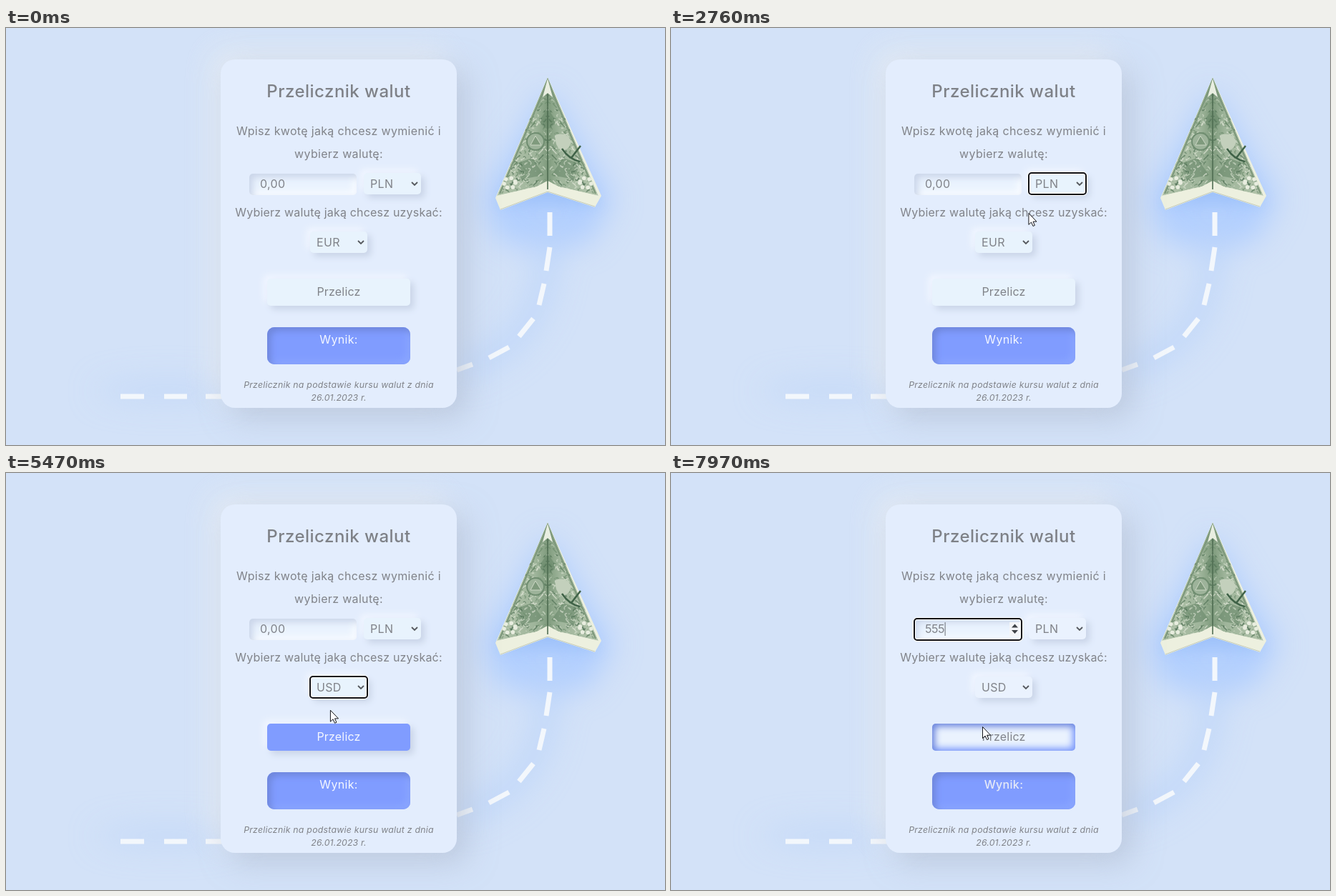
These frames come from a looping animation (921 px wide and 584 px high, 8000 ms). An HTML page:

```html
<!DOCTYPE html>
<html lang="pl">
<head>
<meta charset="utf-8">
<title>Przelicznik walut</title>
<style>
html, body { margin: 0; width: 100%; height: 100%; overflow: hidden; background: #d3e2f8; }
#stage { position: relative; width: 921px; height: 584px; overflow: hidden; }
#stage > * { position: absolute; }
svg { left: 0; top: 0; }
text { font: 16px Inter, "Open Sans", sans-serif; letter-spacing: .02em; fill: #808389; white-space: pre; }
.mid { text-anchor: middle; }
.title { font-size: 24px; font-weight: 500; fill: #7e8187; }
.tight { letter-spacing: .012em; }
.note { font-size: 12.3px; font-style: italic; }
.white { fill: #f4f7ff; }
.card { left: 300px; top: 44px; width: 330px; height: 488px; border-radius: 20px; background: #e3edfd;
  box-shadow: 14px 14px 40px rgba(165,178,200,.5), -14px -14px 40px rgba(236,240,243,.65); }
.input { left: 340px; top: 204px; width: 150px; height: 30px; border-radius: 5px; background: #eaf3fe;
  box-shadow: inset 5px 5px 10px #cbd6ea, inset -5px -5px 10px #f8fbff; }
.raised { border-radius: 5px; background: #e8f3fd; box-shadow: 5px 5px 10px #c9d4e7, -5px -5px 10px #f1f6ff; }
.select { width: 80px; height: 30px; }
.button { left: 365px; top: 351px; width: 200px; height: 38px; }
.result { left: 365px; top: 419px; width: 200px; height: 52px; border-radius: 10px; background: #809cff;
  box-shadow: inset 5px 5px 10px #6f87dc, inset -5px -5px 10px #8aa6ff; }
</style>
</head>
<body>
<div id="stage">
  <svg width="921" height="584">
    <defs>
      <filter id="blur" x="-60%" y="-60%" width="220%" height="220%"><feGaussianBlur stdDeviation="20"/></filter>
      <filter id="soft" x="-40%" y="-40%" width="180%" height="180%"><feGaussianBlur stdDeviation="10"/></filter>
      <clipPath id="wing"><path d="M757 69L686 235L742 222L757 214Z"/></clipPath>
      <linearGradient id="bill" x1="0" x2="1">
        <stop offset="0" stop-color="#b4c5ac"/><stop offset=".75" stop-color="#9fb59b"/><stop offset="1" stop-color="#7f9b7d"/>
      </linearGradient>
    </defs>
    <rect width="921" height="584" fill="#d3e2f8"/>
    <g filter="url(#blur)">
      <path d="M757 85L664 240L690 300L757 310L815 300L850 240Z" fill="#acccff" opacity=".85"/>
      <path d="M760 260C762 400 720 450 630 480" fill="none" stroke="#b9d3fb" stroke-width="34" opacity=".65"/>
      <ellipse cx="225" cy="508" rx="100" ry="17" fill="#bfd5f8" opacity=".6"/>
    </g>
    <path d="M757 130L688 247L757 244L828 247Z" fill="#8fb7f7" opacity=".55" filter="url(#soft)"/>
    <path d="M760 258V291M760 307L755 340M752 358L745 388M737 407L717 432M703 447L675 462M652 471L630 479M160 516H193M221 516H253M279 516H310"
      fill="none" stroke="#f3f7fc" stroke-width="7"/>
    <path d="M757 69L684 238L691 255L757 230L823 251L832 235Z" fill="#edf0df"/>
    <g id="plane"></g>
    <path d="M757 71L750 97L757 91L764 97Z" fill="#e9eee1"/>
    <path d="M757 92V226" stroke="#4f6d52" stroke-width="1.6"/>
    <path d="M691 254L757 229L823 250" fill="none" stroke="#c6ccb9"/>
    <circle cx="740" cy="159" r="12" fill="#9db39a" stroke="#6f8d70" stroke-width="2"/>
    <path d="M733 164L740 151L748 164Z" fill="#7f9a7d" stroke="#ccd7c5"/>
    <path d="M768 150q14 -5 22 8q-3 14 -14 14q-10 -8 -8 -22" fill="#c3d0bc"/>
    <path d="M777 169Q787 184 802 187M790 182L803 165" fill="none" stroke="#3f6247" stroke-width="2.5"/>
  </svg>
  <div class="card"></div>
  <div class="input"></div>
  <div class="raised select" style="left:500px;top:203px"></div>
  <div class="raised select" style="left:425px;top:285px"></div>
  <div class="raised button" id="button"></div>
  <div class="result"></div>
  <svg width="921" height="584">
    <defs><filter id="drop" x="-100%" y="-100%" width="300%" height="350%">
      <feDropShadow dx="0" dy="16" stdDeviation="15" flood-color="#000" flood-opacity=".44"/>
    </filter></defs>
    <text class="mid title" x="465" y="97">Przelicznik walut</text>
    <text class="mid" x="465" y="150">Wpisz kwotę jaką chcesz wymienić i</text>
    <text class="mid" x="465" y="182">wybierz walutę:</text>
    <text class="mid tight" x="465" y="264">Wybierz walutę jaką chcesz uzyskać:</text>
    <text id="amount" x="355" y="224"></text>
    <text x="509" y="224">PLN</text>
    <text id="currency" x="434" y="306"></text>
    <path d="M567 216l4 4l4-4M492 298l4 4l4-4" fill="none" stroke="#55585e" stroke-width="1.8"/>
    <text class="mid tight" id="label" x="465" y="375">Przelicz</text>
    <text class="mid white" id="result" x="465" y="442">Wynik:</text>
    <text class="mid note" x="465" y="504">Przelicznik na podstawie kursu walut z dnia</text>
    <text class="mid note tight" x="465" y="522">26.01.2023 r.</text>
    <g id="spinner">
      <rect x="473" y="209" width="15" height="20" fill="#f4f5f8"/>
      <path d="M476 216.5l4.5-5l4.5 5zM476 220l4.5 5l4.5-5z" fill="#3f4247"/>
    </g>
    <rect id="caret" y="209" width="1" height="19" fill="#6c6f75"/>
    <g id="ring" fill="none">
      <rect width="80" height="30" rx="4" stroke="#fff" stroke-width="4"/>
      <rect width="80" height="30" rx="4" stroke="#101014" stroke-width="2"/>
    </g>
    <g id="menu"></g>
    <circle id="glow" r="12" fill="#f8f65b" opacity=".85"/>
    <path id="arrow" d="M.5 .5V16.5L4.1 13.1L6.6 18.6L9 17.5L6.6 12.2H11.6Z" fill="#fff" stroke="#15161a"/>
    <path id="beam" d="M-3 -8.5H-1L0 -7.5L1 -8.5H3M0 -7.5V7.5M-3 8.5H-1L0 7.5L1 8.5H3" fill="none" stroke="#17181c" stroke-width="1.2"/>
  </svg>
</div>
<script>
const LOOP = 8000;
const $ = id => document.getElementById(id);
const show = (id, on) => { $(id).style.display = on ? '' : 'none'; };
const within = (t, from, to) => t >= from && t < to;
const ramp = (t, from, to) => Math.min(1, Math.max(0, (t - from) / (to - from)));
const place = (id, x, y) => $(id).setAttribute('transform', `translate(${x.toFixed(1)} ${y.toFixed(1)})`);

// time, x, y of the pointer
const route = [
  [120, 858, 572], [910, 617, 328], [1100, 555, 268], [1250, 487, 220], [1440, 513, 212],
  [2550, 513, 212], [3000, 484, 312], [3160, 475, 289], [3360, 475, 296], [4080, 475, 296],
  [4480, 470, 374], [5250, 470, 374], [5470, 453, 332], [5860, 403, 222], [6000, 403, 220],
  [6650, 403, 220], [6780, 410, 220], [7560, 410, 220], [7860, 435, 355], [LOOP, 435, 355]
];

function pointerAt(t) {
  const next = Math.max(1, route.findIndex(point => point[0] > t));
  const [t0, x0, y0] = route[next - 1], [t1, x1, y1] = route[next];
  const k = ramp(t, t0, t1);
  return [x0 + (x1 - x0) * k, y0 + (y1 - y0) * k];
}

function drawPlane() {
  let seed = 17;
  const random = () => (seed = (seed * 16807) % 2147483647) / 2147483647;
  let wing = '<path d="M757 69L686 235L742 222L757 214Z" fill="url(#bill)"/>' +
    '<path d="M757 112L744 132L757 142ZM712 190L735 182L752 206L720 212Z" fill="#68876a" opacity=".6"/>';
  for (let i = 0; i < 230; i++) {
    const y = 92 + 136 * Math.sqrt(random());
    const x = 757 - random() * (y - 69) * .43;
    const color = ['#4c6d52', '#d5dfcd', '#6b8a6a', '#e3e9db'][i % 4];
    const dx = random() * 10 - 5, dy = random() * 9 - 3;
    wing += `<path d="M${x} ${y}q${dy} ${dx} ${dx} ${dy}" stroke="${color}" stroke-width="${.8 + random()}" opacity=".65"/>`;
  }
  wing += '<path d="M754 82L690 232" stroke="#7c977a" stroke-width="2"/>';
  for (let i = 0; i < 7; i++) {
    wing += `<circle cx="${704 + 8 * Math.cos(i)}" cy="${217 + 7 * Math.sin(i)}" r="2.8" fill="#e8eddf"/>`;
  }
  const half = `<g clip-path="url(#wing)" fill="none">${wing}</g>`;
  $('plane').innerHTML = half + `<g transform="matrix(-1 0 0 1 1514 0)">${half}</g>`;
}

function drawMenu(x, y, active) {
  const row = (name, i) => {
    const bar = i === active
      ? `<path d="${['M1 20V5q0-4 4-4H75q4 0 4 4V20z', 'M1 20H79V40H1z', 'M1 40H79V57q0 4-4 4H5q-4 0-4-4z'][i]}" fill="#1e90ff"/>` : '';
    return `${bar}<text x="10.5" y="${15 + 20 * i}"${i === active ? ' class="white"' : ''}>${name}</text>`;
  };
  $('menu').innerHTML = `<g transform="translate(${x} ${y})">
    <rect x=".5" y=".5" width="79" height="61" rx="5" fill="#eaf2fd" stroke="#8b9099" filter="url(#drop)"/>
    ${['PLN', 'EUR', 'USD'].map(row).join('')}</g>`;
}

function drawButton(t) {
  const hover = t < 7000 ? ramp(t, 5150, 5280) * (1 - ramp(t, 5490, 5700)) : ramp(t, 7800, 7900);
  const pressed = t >= 7960;
  const base = t < 6260 ? [232, 243, 253] : [234, 242, 254];
  const mix = (from, to) => Math.round(from + (to - from) * (pressed ? 0 : hover));
  const style = $('button').style;
  style.background = `rgb(${mix(base[0], 128)},${mix(base[1], 156)},${mix(base[2], 255)})`;
  style.boxShadow = pressed ? 'inset 4px 4px 10px #6f88dd, inset -4px -4px 10px #85a2ff' : '';
  $('label').style.fill = `rgb(${mix(128, 244)},${mix(131, 247)},${mix(137, 255)})`;
}

function drawField(t) {
  const typed = t < 6980 ? 0 : t < 7250 ? 1 : t < 7510 ? 2 : 3;
  const amount = $('amount');
  amount.textContent = typed ? '5'.repeat(typed) : '0,00';
  amount.style.letterSpacing = typed ? '-.03em' : '.02em';
  $('caret').setAttribute('x', 355 + 9.2 * typed);
  show('caret', within(t, 6260, 6780) || t >= 6980);
  show('spinner', within(t, 1200, 2420) || t >= 5830);
}

function drawRing(t) {
  const onInput = t >= 6260, onFirst = within(t, 2490, 3560);
  show('ring', onInput || onFirst || within(t, 5150, 6260));
  place('ring', onInput ? 340 : onFirst ? 500 : 425, onInput ? 204 : onFirst ? 203 : 285);
  for (const rect of $('ring').children) rect.setAttribute('width', onInput ? 150 : 80);
}

function render(t) {
  const [x, y] = pointerAt(t);
  const beam = within(t, 5800, 7640) && y < 234;
  show('arrow', t >= 120 && !within(t, 2280, 2420) && !beam);
  show('beam', beam);
  place('arrow', x, y);
  place('beam', x, y);
  show('glow', [[1630, 1890], [2420, 2550], [3560, 3690], [5080, 5210], [6260, 6320]].some(span => within(t, ...span)));
  place('glow', x, y + 1);

  if (within(t, 1700, 2490)) drawMenu(500, 234, 0);
  else if (within(t, 3560, 5150)) drawMenu(425, 316, y < 316 ? 1 : Math.min(2, Math.floor((y - 316) / 20)));
  else $('menu').innerHTML = '';

  $('currency').textContent = t < 5150 ? 'EUR' : 'USD';
  $('result').style.fontWeight = t < 6260 ? 400 : 500;
  $('result').style.fill = t < 6260 ? '' : '#e6eaf7';
  for (const box of document.querySelectorAll('.select')) box.style.background = t < 6260 ? '' : '#eaf2fe';
  drawButton(t);
  drawField(t);
  drawRing(t);
}

drawPlane();
const start = performance.now();
function tick() {
  render((performance.now() - start) % LOOP);
  requestAnimationFrame(tick);
}
tick();
</script>
</body>
</html>
```
